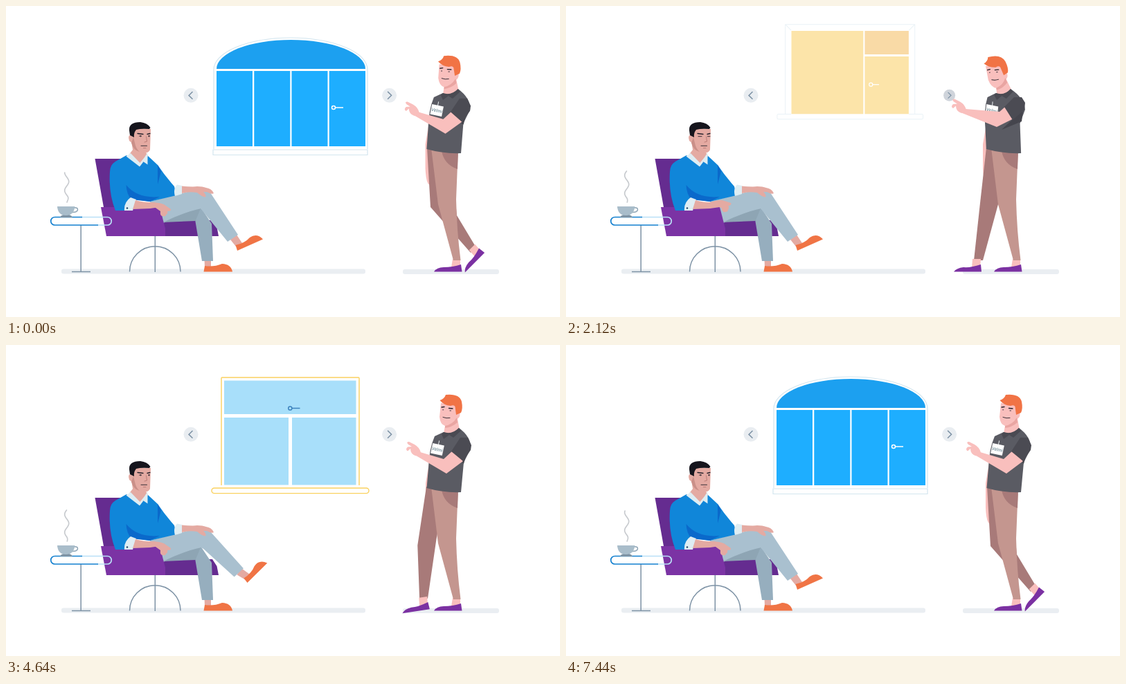
Animation of 800x450 px, one loop 7560 ms. Source, as an HTML page:

```html
<!DOCTYPE html>
<html lang="en">
<head>
<meta charset="utf-8">
<title>Choosing a window</title>
<style>
html, body { margin: 0; width: 100%; height: 100%; overflow: hidden; background: #fff; }
svg { display: block; width: 100vw; height: 100vh; }
.line { fill: none; stroke: #7d92a5; stroke-width: 1.5; }
.pale { fill: none; stroke: #d3e5ee; stroke-width: 1.2; }
.sky { fill: none; stroke: #35aeef; stroke-width: 1.4; }
.gold { fill: none; stroke: #fad15f; stroke-width: 1.4; }
.handle { fill: none; stroke: #fff; stroke-width: 1.5; }
.blue { stroke: #3d83bd; }
.feature { fill: none; stroke: #26222c; stroke-width: 1.3; stroke-linecap: round; }
.fine { stroke-width: .9; }
.soft { stroke: #b0716c; stroke-width: .8; }
.skin { fill: #e4aaa2; }
.pink { fill: #f9bfbd; }
.shoe { fill: #7b31a2; }
.slipper { fill: #f07445; }
.denim { fill: #a9c0cf; }
</style>
</head>
<body>
<svg viewBox="0 0 800 450">
  <g fill="#eaeef2">
    <rect x="80" y="380.5" width="439" height="7" rx="3"/>
    <rect x="573" y="381" width="139" height="7" rx="3"/>
  </g>

  <g id="arch">
    <path class="pale" d="M300 207V92A111 46 0 0 1 522 92V207M299 208H522V215.500H299Z"/>
    <path fill="#1ca0f0" d="M304 91A107.500 42 0 0 1 519 91Z"/>
    <path fill="#1eaeff" d="M304 94h52v109h-52zm54.300 0h52v109h-52zm54.200 0h52v109h-52zm54.200 0h52.300v109h-52.300z"/>
    <path class="handle" d="M475.500 147H487"/><circle class="handle" cx="473" cy="147" r="2.500"/>
  </g>
  <g id="amber">
    <path class="pale" d="M299 207V52H521.500V207M299 52L309 62M521.500 52L511.500 62M309 206.500H287Q285 206.500 285 208.500V213Q285 215 287 215H533.500Q535.500 215 535.500 213V208.500Q535.500 206.500 533.500 206.500H511"/>
    <path fill="#fac748" d="M309.500 63H433V206H309.500ZM435.500 107H511V206H435.500Z"/>
    <path fill="#f4b143" d="M435.500 63H511V103.500H435.500Z"/>
    <path class="handle" d="M449 155.500H460"/><circle class="handle" cx="446" cy="155.500" r="3"/>
  </g>
  <g id="grid">
    <path class="sky" d="M298.500 206V50H522V206M289.500 209.500H530V215.500H289.500Z"/>
    <path class="pale" d="M373 56V205M375.500 56V205M444.500 56V205M447 56V205"/>
    <g id="gridPanes" fill="#b6e8f6"></g>
    <path class="handle blue" d="M446 119V126.500"/><circle class="handle blue" cx="446" cy="128.700" r="2"/>
  </g>
  <g id="sash">
    <path class="gold" d="M311 203V48Q311 47 312 47H509Q510 47 510 48V203"/>
    <rect class="gold" x="297" y="207" width="227" height="7.600" rx="3.800"/>
    <path fill="#a8dffa" d="M315 51.500H505.500V100H315ZM315 105H408V202.500H315ZM413 105H505.500V202.500H413Z"/>
    <path class="handle blue" d="M413 91.500H424.500"/><circle class="handle blue" cx="410.300" cy="91.500" r="2.600"/>
  </g>

  <circle cx="267" cy="129.300" r="10.500" fill="#e9edf1"/>
  <path class="line" d="M269.500 124L264 129.400L269.500 134.800"/>
  <g id="next">
    <circle id="nextDisc" r="10.500"/>
    <path class="line" d="M-2.500 -5.400L3 0L-2.500 5.400"/>
  </g>

  <!-- armchair -->
  <path class="line" d="M215.300 333V385M178.500 384.500A36.750 36.750 0 0 1 252 384.500"/>
  <path fill="#652c90" d="M128.500 221H170L182 240L160 300L141 291ZM220 310H298L304.500 320L307 333H225Z"/>

  <!-- seated man -->
  <path class="skin" d="M286.500 367H296V378H287Z"/>
  <path class="slipper" d="M285.500 384.500L287 376Q300 378 312 373Q325 373.500 327 384.500Z"/>
  <path fill="#96aebe" d="M273 309L281 291L297 315L299 369H283Z"/>
  <path class="denim" d="M208 283L262 269Q284 263 294 270L299 300L281 293L227 314L215 300Z"/>
  <path fill="#8ea5b4" d="M227 313Q252 300 281 293L273.500 311Z"/>
  <g id="shin">
    <g id="foot">
      <path class="skin" d="M324 338L333 331L341 343L332 348Z"/>
      <path class="slipper" d="M331.500 346Q345 343 352 335Q362 328 371 337.500L334 354Z"/>
    </g>
    <path class="denim" d="M281 293L274 274Q287 262 295 270L335 331L320 341Z"/>
  </g>
  <path fill="#7b33a4" d="M137 291H222L230 322V333H145Z"/>
  <path class="skin" d="M181 195L183 208L177 216L195 229L205 217L201 210Z"/>
  <path fill="#1086d9" d="M174 216L158 225Q150 230 150 240Q148 271 158 296L171 296L180 279L208 283L246 274L243 261Q229 245 219 230L205 217L194 231Z"/>
  <path fill="#0a69cb" d="M173.500 259Q190 279 222 276L208 283L181 280Q174 272 173.500 259ZM219 230V258L224 239Z"/>
  <path fill="#deedf3" d="M173.500 217.500L180 213L193.500 227L200 219L204.500 212V229.500L198 225L193 232.500ZM247 258.500Q241 265 244 275L254 272V260ZM188 280L180 277Q170 284 171 296H183Z"/>
  <circle cx="175" cy="292.500" r="1.200" fill="#246"/>
  <path class="skin" d="M254 260.500Q270 262 276 261Q284 261 289 263Q297 264 300 271Q297 273 290 269L285 269Q290 274 288 276.500Q283 276 276 270Q264 268 254 271Z"/>
  <path class="skin" d="M187 281Q202 285 215 284L222 291L208 293L183 294Z"/>
  <path id="hand" class="skin" d="M207 284Q221 284 228 287L238 294Q239 297 233 297Q234 301 231 302Q231 305 226 304Q222 304 223 297L216 292L205 292Z"/>
  <path class="skin" d="M186 178H209L208 208Q206 213 200 212Q190 210 184 200L178 195Q175 187 181 186Z"/>
  <path fill="#ca8f88" d="M184 190L187 202Q189 208 193 211Q184 209 181 198Z"/>
  <path fill="#16151d" d="M178 180Q177 168 194 168Q204 169 208.500 176L207 178Q195 177 188 179Q184 184 185 190L179 187Z"/>
  <path class="feature" d="M190 184.500L198 185.500M204 185.500L208 184.500"/>
  <path id="eyes" class="feature fine"/>
  <path class="feature soft" d="M202.500 189L203.500 196L200 197M198.500 205.500H202"/>
  <path class="feature fine" d="M195 202.300H203.500"/>

  <!-- table and cup -->
  <path class="line" d="M108.200 317V384.500M95 384.500H122"/>
  <path fill="none" stroke="#b9e0f7" stroke-width="1.700" d="M109 305.500H146.500A5.700 5.700 0 0 1 146.500 317H132"/>
  <path fill="none" stroke="#1380cf" stroke-width="1.700" d="M110 305.500H70.500A5.700 5.700 0 0 0 70.500 317H133"/>
  <path fill="none" stroke="#8fa5b5" stroke-width="1.500" d="M97 292Q104 291 103.500 295Q102.500 299 95 298.500"/>
  <path fill="#7d93a4" d="M78 306Q79 303 83 302H91Q95 303 96 306Z"/>
  <path fill="#a9bdca" d="M74 290H99.500Q98 303 86.500 303Q75 303 74 290Z"/>
  <path id="steam" fill="none" stroke="#c8cbcf" stroke-width="1.700" stroke-linecap="round"/>

  <!-- standing man -->
  <path id="farArm" class="pink" d="M612 165L606 200L606 235Q607 257 612 259L618 230Z"/>
  <path id="backLeg" fill="#a87a79"/>
  <g id="backShoe">
    <path class="pink" d="M-7 -6H5L4 7H-8Z"/>
    <path class="shoe" d="M-34 12.500Q-30 7 -20 6Q-10 7 5 2L6 12.500Z"/>
  </g>
  <path class="pink" d="M645 366H656V378H643Z"/>
  <path class="shoe" d="M618 384.500Q622 378 632 378Q645 378 657 374L658.500 384.500Z"/>
  <path fill="#c4968f" d="M614 205H653L650 280Q651 325 656.500 368H646L624 287Z"/>
  <path fill="#a87a79" d="M629 209H653L652 236Q632 229 629 209Z"/>
  <g id="torso">
    <g id="head">
      <path class="pink" d="M628 84Q627 95 626 104Q627 115 634 117L632 128L646 135L655 123L652 107Q657 103 655 97L648 85Z"/>
      <path fill="#e9a5a2" d="M634 117Q645 115 651 105L652 112Q644 119 634 120Z"/>
      <path fill="#f17345" d="M626.500 80Q633 78 635 72Q655 70 658 82Q660 92 657 98L650 101L648.500 89Q647 86 642 88Q632 87 626.500 80Z"/>
      <path class="feature" d="M629 90L633 89.500M639.500 91.500L645 92"/>
      <path class="feature fine" d="M630.700 93.800H631.700M641 95H642.500M631 104.500Q636 106.500 641 105.500"/>
    </g>
    <path fill="#5a5b63" d="M632 126L619 132Q611 150 610 178L607.500 207Q632 214 657 213L661 170L671 150Q672 133 654 120Q644 131 632 126Z"/>
    <path fill="#4a4a52" d="M632 126Q644 130 654 120L657 124L646 134L640 130L632 136L629 129Z"/>
    <g transform="translate(623 151) rotate(12)">
      <path stroke="#e7ecef" d="M0 -13V-7"/>
      <rect x="-8.500" y="-7.500" width="17" height="15" fill="#fff"/>
      <text y="2.500" text-anchor="middle" font-family="'Open Sans', Arial, sans-serif" font-size="6.500" font-style="italic" fill="#476b79">Velmi</text>
    </g>
  </g>
  <path id="armShade" fill="#45454d"/>
  <path id="forearm" class="pink"/>
  <path id="fist" class="pink" d="M599 155.500Q597 148 590 144L582 140Q577 140 581 144L586 147L580 147.500Q576 151 580 153.500L584 150Q584 158 592 160.500Z"/>
  <path id="sleeve" fill="#4b4b53"/>
</svg>

<script>
const LOOP = 7560;
const el = id => document.getElementById(id);
const clamp = v => Math.min(1, Math.max(0, v));
const ease = v => (v = clamp(v), v * v * (3 - 2 * v));
const ramp = (t, from, to) => ease((t - from) / (to - from));
const mix = (a, b, k) => a.map((v, i) => v + (b[i] - v) * k);
const set = (id, name, value) => el(id).setAttribute(name, value);
const move = (id, value) => set(id, "transform", value);
const polygon = p => "M" + p.map(v => v.toFixed(2)).join(" ") + "Z";

// Times at which the pointing finger arrives at the button
const presses = [400, 2120, 4110, 6660];

// Each window: when it enters and leaves, how far it rises and how quickly it fades
const panels = [
  { id: "arch", cx: 411, cy: 130, enter: 6653, leave: 460, rise: 55, fade: 1 },
  { id: "amber", cx: 410, cy: 133, enter: 860, leave: 1884, rise: 60, fade: .75 },
  { id: "grid", cx: 410, cy: 133, enter: 2284, leave: 3890, rise: 55, fade: 1 },
  { id: "sash", cx: 410.5, cy: 130.5, enter: 4240, leave: 6253, rise: 53, fade: 1.65 }
];

// Back leg outlines: hip, knee, ankle, ankle, knee, hip
const legFront = [607, 205, 598, 285, 589, 368, 602, 368, 624, 287, 632, 210];
const legLift = [607, 205, 594, 290, 596, 367, 608, 367, 621, 281, 634, 210];
const legCrossed = [608, 205, 613, 291, 671, 357, 678, 348, 651, 303, 642, 210];
const shoeFront = [594, 372, 0], shoeLift = [603, 371, -8], shoeCrossed = [678, 352.5, -45];

const armRest = [645, 153, 632, 165, 598, 155, 592, 160, 636, 186, 660, 168];
const armPoint = [634, 146, 626, 153, 577, 149, 571, 154.5, 622, 175, 646, 163];
const sleeveRest = [643, 154, 656, 134, 667, 134, 672, 145, 671, 152, 660, 168];
const sleevePoint = [633, 146, 647, 132, 658, 132, 663, 140, 662, 150, 645, 165];
const shadeRest = [655, 165, 664, 160, 661, 172];
const shadePoint = [629, 179, 660, 150, 658, 167];

let panes = "";
for (let sash = 0; sash < 3; sash++)
  for (let col = 0; col < 2; col++)
    for (let row = 0; row < 4; row++)
      panes += `<rect x="${306 + sash * 72 + col * 33}" y="${58.3 + row * 36.2}" width="31" height="33.5"/>`;
el("gridPanes").innerHTML = panes;

function drawPanel({ id, cx, cy, enter, leave, rise, fade }, t) {
  const after = ramp(t, leave, leave + 400);
  const before = 1 - ramp(t, enter, enter + 380);
  const wraps = enter > leave;
  const gone = wraps ? Math.min(after, before) : Math.max(after, before);
  const leaving = t >= leave && !(wraps && t >= enter);
  const shift = (leaving ? -rise : 45) * gone;
  set(id, "opacity", Math.pow(1 - gone, fade));
  move(id, `translate(${cx} ${cy + shift}) scale(${1 - .25 * gone}) translate(${-cx} ${-cy})`);
}

function drawSteam(t) {
  const p = t / 2520, turn = 2 * Math.PI;
  const top = 244 + 6 * Math.cos(turn * (p - .34));
  let d = "";
  for (let y = 284; y >= top; y -= 1) {
    const x = 87.7 + 3 * Math.cos(turn * ((y - 254) / 26 + p)) * clamp((286 - y) / 10);
    d += (d ? "L" : "M") + x.toFixed(2) + " " + y;
  }
  set("steam", "d", d);
}

function drawSeated(t) {
  const kick = ramp(t, 4240, 4640) * (1 - ramp(t, 5500, 6240));
  move("shin", `rotate(${-8.7 * kick} 288 275)`);
  move("foot", `rotate(${-12 * kick} 328 337)`);
  const lift = ramp(t, 1860, 2080) * (1 - ramp(t, 2160, 2440));
  move("hand", `rotate(${-17 * lift} 208 289)`);
  const blink = [2120, 6440].some(at => Math.abs(t - at) < 90);
  set("eyes", "d", blink ? "M191 188.700H196M204.500 188.700H208" : "M192.500 188.200H195.500M205.500 188.200H207.500M194.500 187.500V189M206.500 187.500V189");
}

function drawBackLeg(t) {
  const step = 1 - ramp(t, 240, 960) + ramp(t, 4380, 5260);
  const blend = (a, b, c) => step < .2 ? mix(a, b, step / .2) : mix(b, c, (step - .2) / .8);
  set("backLeg", "d", polygon(blend(legFront, legLift, legCrossed)));
  const [x, y, angle] = blend(shoeFront, shoeLift, shoeCrossed);
  move("backShoe", `translate(${x} ${y}) rotate(${angle})`);
}

function drawStanding(t) {
  const reach = Math.max(...presses.map(at => ramp(t, at - 500, at) * (1 - ramp(t, at + 40, at + 380))));
  const lean = .13 * reach;
  move("torso", `matrix(1 0 ${lean} 1 ${-212 * lean} 0)`);
  move("head", `rotate(${-9 * reach} 644 122)`);
  move("farArm", `translate(${-4 * reach} 0)`);
  const raise = -3 * Math.sin(Math.PI * reach);
  const arm = mix(armRest, armPoint, reach);
  arm[5] += raise;
  arm[7] += raise;
  set("forearm", "d", polygon(arm));
  set("sleeve", "d", polygon(mix(sleeveRest, sleevePoint, reach)));
  set("armShade", "d", polygon(mix(shadeRest, shadePoint, reach)));
  move("fist", `translate(${-21 * reach} ${-5.5 * reach + raise})`);

  const press = clamp((reach - .2) / .8);
  move("next", `translate(553.600 129.300) scale(${1 - .19 * press})`);
  set("nextDisc", "fill", `rgb(${mix([233, 237, 241], [207, 212, 219], press).map(Math.round)})`);
}

function draw(now) {
  const t = now % LOOP;
  panels.forEach(panel => drawPanel(panel, t));
  drawSteam(t);
  drawSeated(t);
  drawBackLeg(t);
  drawStanding(t);
}

const start = performance.now();
function tick() {
  draw(performance.now() - start);
  requestAnimationFrame(tick);
}
tick();
</script>
</body>
</html>
```
